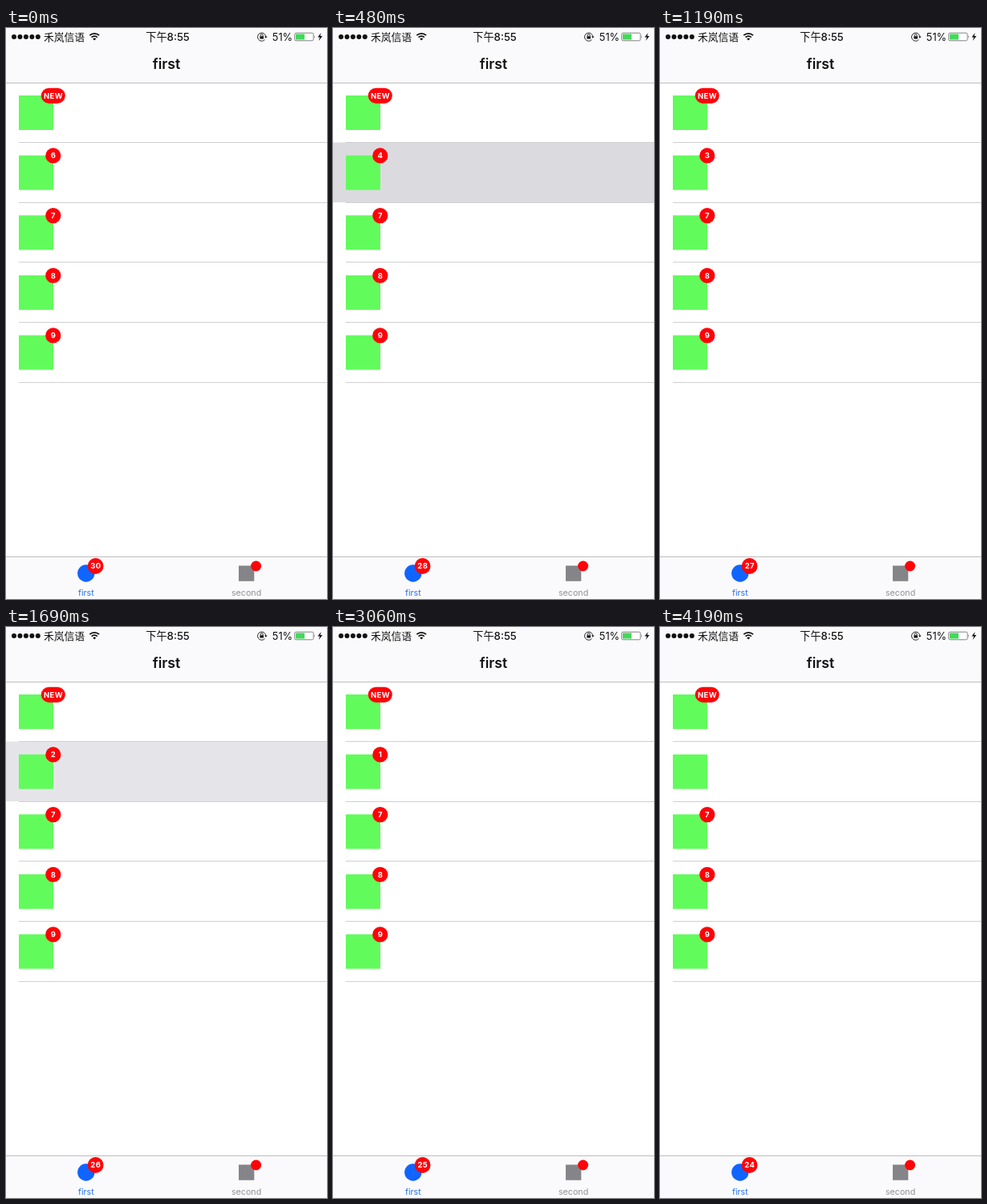
Write an HTML page that moves like this. It is 400 by 711 pixels and loops after 7.03 s.

```html
<!DOCTYPE html>
<html lang="zh">
<head>
<meta charset="utf-8">
<title>Badges</title>
<style>
  html, body { margin: 0; width: 100%; height: 100%; overflow: hidden; background: #fff; }
  svg { display: block; width: 100%; height: 100%; font-family: Inter, "Noto Sans CJK SC", "Noto Sans CJK", sans-serif; }
  text { text-anchor: middle; }
  .bar { fill: #fafafc; }
  .edge { stroke: #bebec2; }
  .line { stroke: #d0d0d2; }
  .status { font-size: 12.8px; fill: #111; }
  .stroke { fill: none; stroke: #111; }
  .clock { font-size: 13.2px; font-weight: 500; }
  .title { font-size: 17.6px; font-weight: 600; fill: #111; }
  .tab { font-size: 10.7px; }
  .badge { fill: #fd0309; }
  .count { font-size: 9.5px; font-weight: 700; letter-spacing: .4px; fill: #fff; }
</style>
</head>
<body>
<svg viewBox="0 0 400 711">
  <rect width="400" height="711" fill="#fff"/>
  <rect class="bar" width="400" height="68"/>
  <path class="edge" d="M0 68.5H400"/>

  <g class="status">
    <path d="M10 11h30" stroke="#111" stroke-width="6" stroke-linecap="round" stroke-dasharray="0 7.45"/>
    <text x="72.5" y="15.5">禾岚信语</text>
    <path class="stroke" stroke-width="1.7" d="M104.3 9.2a8.4 8.4 0 0 1 11.8 0M106.6 11.6a5.1 5.1 0 0 1 7.2 0"/>
    <path d="M110.2 15.6l-2-2.2a3 3 0 0 1 4 0z"/>
    <text class="clock" x="201.5" y="15.6">下午8:55</text>
    <path class="stroke" stroke-width=".9" d="M322.4 14.6A5.1 5.1 0 1 1 323.7 10.6M317.2 10.3V9.2a1.5 1.5 0 0 1 3 0v1.1"/>
    <path d="M316.4 10.2h4.6v3.4h-4.6zM322 10.4h3.6l-1.8 2.3z"/>
    <text x="344.5" y="15.5">51%</text>
    <rect x="359.7" y="6.2" width="23.4" height="9.6" rx="1.6" fill="#fff" stroke="#777" stroke-width=".9"/>
    <rect x="361" y="7.5" width="11" height="7" fill="#43d85b"/>
    <path d="M384 9.3q1.7 1.7 0 3.4z" fill="#777"/>
    <path d="M392.6 6l-4.2 5.6h2.7l-1.4 4.5 4.6-6h-2.8z"/>
  </g>
  <text class="title" x="200" y="51">first</text>

  <rect id="highlight" y="142.5" width="400" height="74.7" fill="#fff"/>
  <g id="rows"></g>

  <rect class="bar" y="658" width="400" height="53"/>
  <path class="edge" d="M0 658.5H400"/>
  <circle cx="99.8" cy="679" r="10.7" fill="#1064ff"/>
  <rect x="290" y="669.5" width="19.3" height="19.3" fill="#858589"/>
  <circle class="badge" cx="111.6" cy="670" r="9.9"/>
  <text class="count" id="total" x="111.8" y="673.4">30</text>
  <circle class="badge" cx="311.6" cy="670" r="6.5"/>
  <text class="tab" x="99.8" y="707" fill="#1f6ff0">first</text>
  <text class="tab" x="299.6" y="707" fill="#929296">second</text>
</svg>
<script>
  const LOOP = 7030, PITCH = 74.65;
  const byId = id => document.getElementById(id);

  byId('rows').innerHTML = ['NEW', 6, 7, 8, 9].map((label, i) => {
    const y = i * PITCH, half = i ? 9.6 : 15;
    return `<rect x="16" y="${y + 84}" width="43" height="43" fill="#62fb5c"/>
      <path class="line" d="M16 ${Math.round(y + 142) + .5}H400"/>
      <g class="row-badge">
        <rect class="badge" x="${58.8 - half}" y="${y + 74.7}" width="${half * 2}" height="19.2" rx="9.6"/>
        <text class="count" x="59" y="${y + 87.7}">${label}</text>
      </g>`;
  }).join('');

  // Start time, unread count of the second row, row background
  const steps = [
    [0, 6, '#fff'],
    [200, 5, '#d9d9dc'], [280, 5, '#ececee'], [380, 5, '#fff'],
    [480, 4, '#dbdbdf'], [560, 4, '#eeeeef'], [650, 4, '#fff'],
    [900, 3, '#ececec'], [1020, 3, '#fff'],
    [1690, 2, '#e5e5e9'], [1900, 2, '#fff'],
    [2310, 1, '#d1d1d4'], [2560, 1, '#ececee'], [2810, 1, '#fff'],
    [3310, 0, '#d6d6d9'], [3610, 0, '#eeeeef'], [3900, 0, '#fff']
  ];

  const highlight = byId('highlight'), total = byId('total');
  const badge = document.querySelectorAll('.row-badge')[1];
  const badgeText = badge.querySelector('text');
  const OTHER_ROWS = 7 + 8 + 9;

  function draw() {
    const t = performance.now() % LOOP;
    const [, count, shade] = steps.findLast(([start]) => start <= t);
    highlight.setAttribute('fill', shade);
    badge.setAttribute('visibility', count ? 'visible' : 'hidden');
    badgeText.textContent = count;
    total.textContent = OTHER_ROWS + count;
    requestAnimationFrame(draw);
  }
  draw();
</script>
</body>
</html>
```
